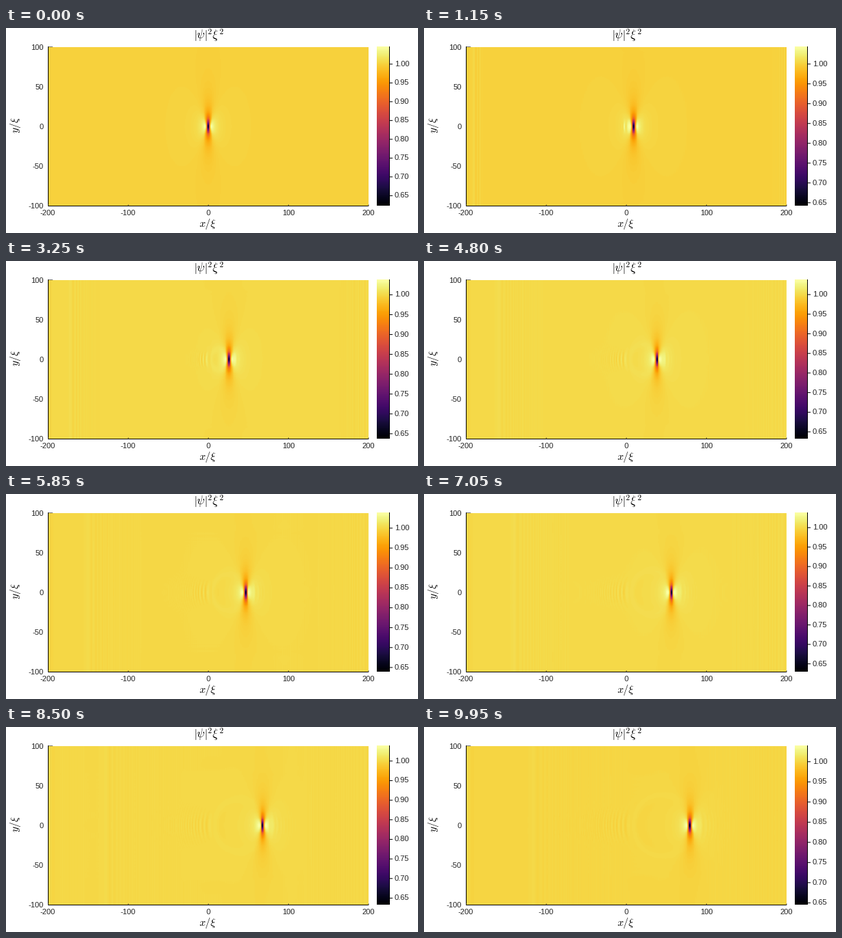
These frames come from a looping animation (600 by 300 pixels, 10 s). A matplotlib script:

```python
import numpy as np
import matplotlib.pyplot as plt
from matplotlib.animation import FuncAnimation

plt.rcParams["font.family"] = "Liberation Sans"
plt.rcParams["mathtext.fontset"] = "cm"

FRAMES, INTERVAL = 200, 50
W, H = 600, 300
LEFT, RIGHT, TOP, BOTTOM = 61.5, 528, 27, 260
LX, LY, NX, NY = 400, 200, 512, 128
DEPTH = 0.3766        # density dip of the starting lump
FLOW = 1.07           # strength of the starting phase
FRAME_TIME = 0.1795   # simulated time per frame
STEPS = 2
DRIFT = 1.3           # speed of the background flow

dx, dy = LX / NX, LY / NY
x = -LX / 2 + dx * np.arange(NX)
y = (-LY / 2 + dy * np.arange(NY))[:, None]


def lump():
    """Rational soliton with matching density and phase."""
    a2 = 2 / DEPTH
    b2 = a2 * a2 * 4 / 3
    f = 1 + x**2 / a2 + y**2 / b2
    density = 1 - DEPTH * (1 - x**2 / a2 + y**2 / b2) / f**2
    phase = -FLOW * 2 * x / a2 / f
    return np.sqrt(density) * np.exp(1j * phase)


def widen(n):
    """Close the periodic grid and double the rows."""
    n = np.pad(n, ((0, 1), (0, 1)), mode="wrap")
    out = np.empty((2 * NY + 1, NX + 1), np.float32)
    out[::2] = n
    out[1::2] = (n[1:] + n[:-1]) / 2
    return out


def simulate():
    """Split-step evolution of the condensate in a moving frame."""
    kx = 2 * np.pi * np.fft.fftfreq(NX, dx)
    ky = 2 * np.pi * np.fft.fftfreq(NY, dy)[:, None]
    dt = FRAME_TIME / STEPS
    kinetic = np.exp(-1j * dt * ((kx**2 + ky**2) / 2 + DRIFT * kx))
    psi = lump()
    fields = []
    for _ in range(FRAMES):
        n = np.abs(psi) ** 2
        fields.append(widen(n))
        for _ in range(STEPS):
            psi = psi * np.exp(-0.5j * dt * (np.abs(psi) ** 2 - 1))
            psi = np.fft.ifft2(kinetic * np.fft.fft2(psi))
            psi = psi * np.exp(-0.5j * dt * (np.abs(psi) ** 2 - 1))
    return fields


fields = simulate()

fig = plt.figure(figsize=(W / 100, H / 100), dpi=100, facecolor="white")


def panel(x0, y0, x1, y1):
    ax = fig.add_axes([x0 / W, 1 - y1 / H, (x1 - x0) / W, (y1 - y0) / H])
    ax.axis("off")
    return ax


heat = panel(LEFT, TOP + 1, RIGHT, BOTTOM)
image = heat.imshow(fields[0], cmap="inferno", origin="lower", aspect="auto",
                    interpolation="nearest",
                    extent=[-(LX + dx) / 2, (LX + dx) / 2,
                            -LY / 2 - dy / 4, LY / 2 + dy / 4])
heat.set(xlim=(-LX / 2, LX / 2), ylim=(-LY / 2, LY / 2))

bar = panel(540, TOP, 558, BOTTOM)
bar.imshow(np.arange(256)[:, None], cmap="inferno", origin="lower",
           aspect="auto", interpolation="nearest")

page = panel(0, 0, W, H)
page.set(xlim=(0, W), ylim=(H, 0))


def line(xs, ys, color="black"):
    return page.plot(xs, ys, color=color, lw=0.72, snap=False,
                     solid_capstyle="butt")[0]


def label(px, py, text, size=11.1, ha="center", color="#222222", **kw):
    return page.text(px, py, text, fontsize=size * 0.72, ha=ha,
                     va="center", color=color, **kw)


line([61.5, 61.5], [TOP, BOTTOM + 1])
line([61, RIGHT], [260.5, 260.5])
line([62, 68], [27.5, 27.5], "#777777")
line([558.5, 558.5], [TOP, BOTTOM])
for v in range(-200, 201, 100):
    px = LEFT + (v + 200) * (RIGHT - LEFT) / 400
    line([px, px], [258.5, 260.5], "#333333")
    label(px - 0.5, 271, str(v))
for v in range(-100, 101, 50):
    label(54.5, BOTTOM - (v + 100) * (BOTTOM - TOP) / 200 + 1.5, str(v),
          ha="right")
label(295, 11, r"$|\psi|^2\xi^2$", 16.8, color="black")
label(294, 287, r"$x/\xi$", 15.5, color="black")
label(14, 141.5, r"$y/\xi$", 15.5, color="black", rotation=90)

marks = [(line([558, 563], [0, 0]), label(566, 0, "", ha="left"))
         for _ in range(10)]


def draw(i):
    field = fields[i]
    lo, hi = float(field.min()), float(field.max())
    image.set_data(field)
    image.set_clim(lo, hi)
    first = int(np.ceil(lo / 0.05))
    for j, (tick, text) in enumerate(marks):
        v = (first + j) * 0.05
        shown = v <= hi
        py = BOTTOM - (v - lo) / (hi - lo) * (BOTTOM - TOP)
        tick.set_ydata([py, py])
        text.set_y(py)
        text.set_text(f"{v:.2f}")
        tick.set_visible(shown)
        text.set_visible(shown)
    return []


anim = FuncAnimation(fig, draw, frames=FRAMES, interval=INTERVAL,
                     repeat=True, repeat_delay=0, blit=False)
plt.show()
```
